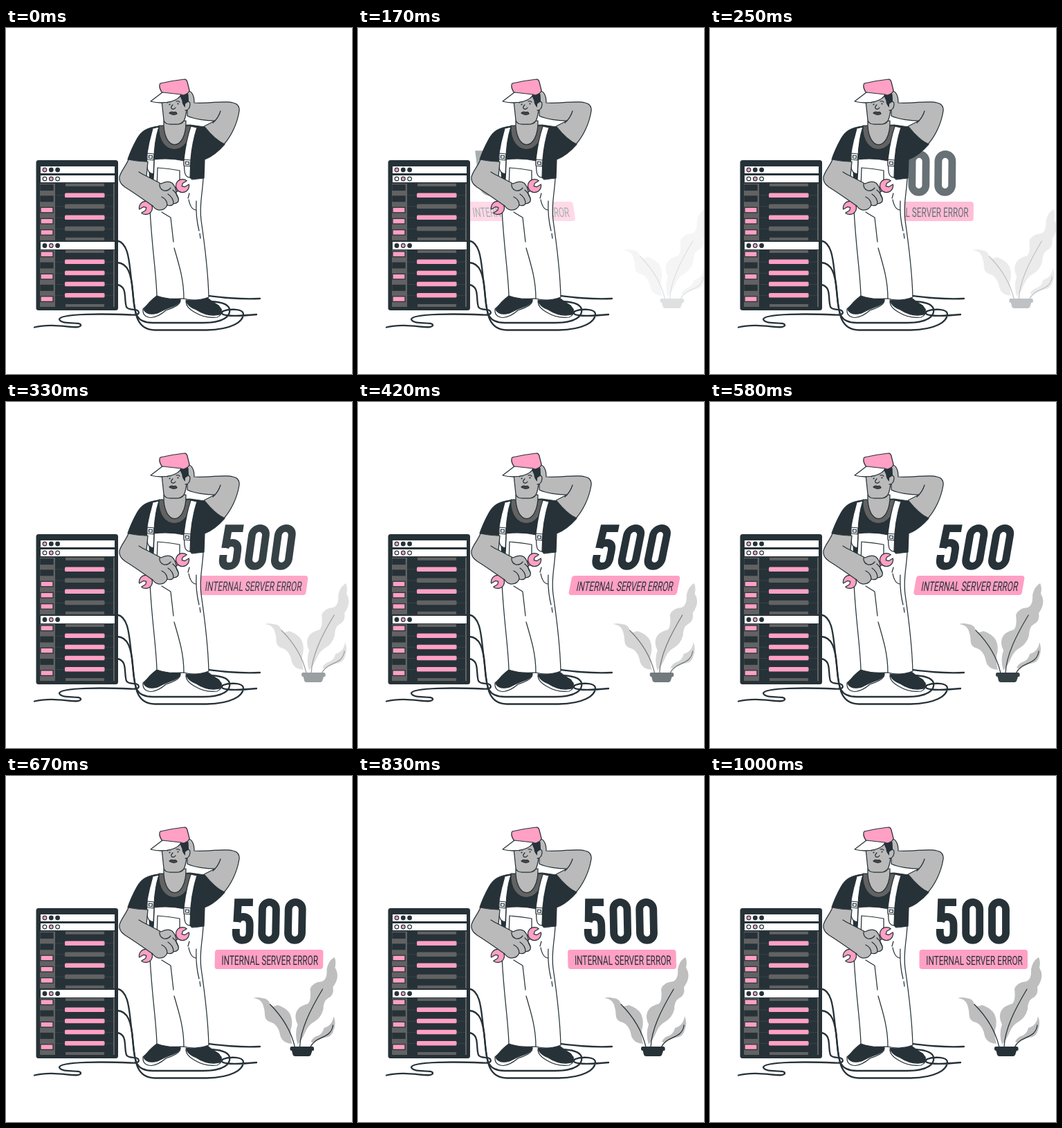
An HTML page for the animation above (1040 ms loop, 500x500 px).

```html
<!DOCTYPE html>
<html lang="en">
<head>
<meta charset="utf-8">
<title>500 Internal server error</title>
<style>
  html, body { margin: 0; width: 100%; height: 100%; overflow: hidden; background: #fff; }
  svg { display: block; width: 100vw; height: 100vh; }
  .ink { fill: #263238; }
  .pink { fill: #ffa0c4; }
  .skin { fill: #bababa; }
  .white { fill: #fff; }
  .line { fill: none; }
  .edge { stroke: #263238; stroke-width: 1.25; stroke-linecap: round; stroke-linejoin: round; }
  .cable { fill: none; stroke: #263238; stroke-width: 2.3; stroke-linecap: round; }
  .digits { fill: none; stroke: #263238; stroke-width: 10.8; }
  .label { font: 400 19px Roboto, "Liberation Sans", sans-serif; text-anchor: middle; }
</style>
</head>
<body>
<svg viewBox="0 0 500 500">
  <g id="sign">
    <g class="digits">
      <path d="M356 182.700H334.500L333.500 211M333.500 211Q335 203.500 342 203.500Q352 203.500 352 215V226Q352 237.300 342 237.300Q332.300 237.300 332.300 226V221"/>
      <rect x="369.700" y="182.400" width="20" height="54.900" rx="10"/>
      <rect x="407.500" y="182.400" width="20" height="54.900" rx="10"/>
    </g>
    <rect class="pink" x="302.500" y="251" width="156.500" height="28" rx="4"/>
    <text class="label ink" transform="translate(382 272.700) scale(.62 1)">INTERNAL SERVER ERROR</text>
  </g>

  <g id="plant">
    <g fill="#bebebe">
      <path d="M358 321Q363 319 371 321Q380 321 383 332Q387 334 393 331Q406 335 411 344Q416 355 412 367Q411 376 414 387Q400 386 397 376C395 363 389 357 381 355C372 351 376 343 373 335Q371 322 358 321Z"/>
      <path d="M475 262Q478 267 476 277Q484 290 473 305Q475 317 466 321Q459 325 459 337Q456 349 446 355Q437 360 433 370Q429 380 422 388Q417 373 422 359Q417 350 420 341Q424 332 437 329Q442 324 440 308Q443 298 457 297Q465 294 464 279Q466 269 472 264Z"/>
      <path d="M474 347Q478 357 474 367Q472 377 461 378Q453 380 445 386L441 384Q444 377 452 375Q458 372 460 364Q472 361 474 347Z"/>
    </g>
    <path class="edge line" d="M382 330C397 345 412 366 418 392M458 308C440 338 426 366 425 392M473 360C470 381 449 374 440 392"/>
    <path class="ink" d="M413 391H443Q445.500 391 445.500 393V396Q445.500 397 443 397L441 403Q440 405 438 405H418Q416 405 415 403L413.500 397Q411 397 411 395V393Q411 391 413 391Z"/>
  </g>

  <g class="cable">
    <path d="M161 307.500C179 311 178 345 182 370C186 400 183 436.500 215 436.500H290C325 436 343 425 343 413C342 405 322 406 314 409C306 415 320 418 362 414"/>
    <path d="M161 339C176 340 181 355 183 380C186 408 184 426 212 426H285C315 426 325 416 323 406C320 396 302 395 290 395"/>
    <path d="M161 371C176 374 170 391 174 403C177 409 188 405 191 409C194 414 188 415 180 414.500C145 413 78 412 77 421C80 430 109 423 108 430C104 437 72 425 41 432.500"/>
    <path d="M252 383C285 384 315 393 367 391"/>
  </g>

  <g id="server">
    <rect class="ink" x="43.500" y="191" width="118.500" height="217" rx="3.500"/>
  </g>

  <g id="man" class="edge">
    <path class="skin" d="M262 90Q272 92 272 108C290 110 318 104 328 108Q338 110 337 120C334 140 324 158 315 168L278 148C290 138 298 137 302 134C290 134 272 132 262 127Z"/>
    <path class="line" d="M310 120Q307 130 299 137"/>
    <path class="white" d="M218 391Q204 400 198 406Q197 418 210 418.500Q221 417 231 408Q253 401 252 393Z"/>
    <path class="ink" d="M218 387Q236 393 252 391Q252 398 242 402Q230 406 219 412Q204 416 199 407Q206 396 218 387Z"/>
    <path class="white" d="M260 395Q260 404 273 411Q288 420 305 418Q313 415 311 406L291 392Z"/>
    <path class="ink" d="M260 393Q276 396 291 390Q298 396 307 401Q314 409 309 414Q292 418 275 407Q262 402 260 393Z"/>
    <path class="ink" d="M219 142C204 144 196 149 190 159Q181 175 176 190L206 193L208 222L286 217L287 190Q302 184 316 168C306 164 295 153 287 143L266 140Z"/>
    <path d="M221 141C218 187 268 187 267 141Z" fill="#626262"/>
    <path class="skin" d="M228 134C226 180 261 180 260 134Z"/>
    <path class="white" d="M214 190Q236 187 258 192C259 205 264 215 269 219L285 217C284 240 279 255 282 278C287 312 292 350 293 389Q275 396 257 391L252 391Q235 393 218 387C217 352 211 320 208 262Q214 225 214 190Z"/>
    <path class="white" d="M212 145L221 143Q214 165 214 191L213 211Q204 210 204 199L203 186Q206 165 212 145Z"/>
    <path class="white" d="M267 142L276 144Q269 166 267 190L266 216Q259 216 258 207L257 190Q260 163 267 142Z"/>
    <path class="white" d="M204 181L214 182L213 191L204 190ZM257 190L267 191L266 200L257 199Z"/>
    <path class="line" d="M206.500 184L211.500 184.500L211 188.500L206.500 188ZM259.500 193L264.500 193.500L264 197.500L259.500 197ZM218 232L219 202Q235 203 251 206V222M265 239L263 246M264 248Q267 263 275 263M275 250C274 270 277 285 279 293M280 297L281 304M225 266L238 274L242 309M243 318C251 345 257 365 257 391"/>

    <path class="skin" d="M225 105L228 133Q229 139 237 139H249Q257 138 259 129L263 110V96H230Z"/>
    <path class="ink" d="M252 98L262 93L264 110Q260 107 259 114Q255 110 255 105Z"/>
    <path class="skin" d="M259 109Q266 103 266 111Q265 119 259 119"/>
    <path class="line" d="M241 111Q237 115 240 117Q243 118 245 115M233 108Q235 106 238 107M246 106Q249 105 251 107"/>
    <g class="ink" stroke="none">
      <circle cx="236.500" cy="110.500" r="1.100"/>
      <circle cx="248.500" cy="109.500" r="1.100"/>
    </g>
    <path d="M236 123Q239 120 242 122Q246 120 247 124Q242 127 236 123Z" fill="#45494b"/>
    <path class="pink" d="M223 80Q240 76 258 74Q261 74 262 78L265 90Q265 94 257 97L226 94Q221 87 222 82Z"/>
    <path class="white" d="M226 93L209 106Q224 110 239 106Q250 103 253 96Z"/>

    <g id="wrench" class="pink" transform="translate(228.500 244) rotate(-31)">
      <path d="M-28 -3H28V3H-28Z"/>
    </g>
    <path class="skin" d="M177 190C173 200 166 207 164 215C163 221 166 226 172 230C188 240 203 251 212 257Q216 263 222 263Q230 263 233 256Q239 258 242 254Q251 253 249 246Q245 240 246 236Q245 229 240 224Q234 220 224 225L203 214L205 193Q190 193 177 190Z"/>
    <path class="line" d="M203 214Q198 212 192 208M222 225Q221 232 228 235Q234 236 238 231M233 256Q233 248 225 244M242 254Q242 245 234 240M249 246Q247 239 241 234"/>
  </g>
</svg>
<script>
const $ = id => document.getElementById(id);
const svgNS = 'http://www.w3.org/2000/svg';
const INK = '#263238', PINK = '#ffa0c4', GREY = '#626262';

function add(parent, tag, attrs) {
  const el = document.createElementNS(svgNS, tag);
  for (const key in attrs) el.setAttribute(key, attrs[key]);
  parent.appendChild(el);
}

// Server rack
const server = $('server');
const box = (x, y, width, height, fill, more) => add(server, 'rect', { x, y, width, height, fill, ...more });

function lightBar(y, height, colours) {
  box(50, y, 107, height, '#fff');
  colours.forEach((fill, i) => add(server, 'circle',
    { cx: 56 + i * 9.3, cy: y + height / 2, r: 2.8, fill, stroke: INK, 'stroke-width': 1.2 }));
}

function rack(top, slots, bars) {
  box(49, top, 108, 82, GREY);
  box(71, top, 84, 82, INK);
  slots.forEach((fill, i) =>
    box(50, top + 2 + i * 16.2, 18, 7.6, fill, { stroke: INK, 'stroke-width': 1.3 }));
  box(86, top, 56, 4, GREY);
  box(86, top + 78, 56, 4, GREY);
  bars.forEach((fill, i) => {
    const y = top + 13.6 + i * 16.1;
    box(71, y + 3.2, 84, .5, '#45535a');
    box(85, y, 57.5, 6.5, fill, { rx: 1.5 });
  });
}

lightBar(200, 10, [PINK, INK, INK]);
lightBar(213, 10, ['#fff', PINK, '#fff']);
rack(224.8, [INK, INK, PINK, PINK, PINK], [PINK, GREY, PINK, GREY]);
lightBar(309, 11, [INK, PINK, INK]);
rack(321, [PINK, INK, PINK, INK, PINK], [PINK, PINK, PINK, PINK]);

// Wrench jaws
for (const side of [1, -1]) add($('wrench'), 'path', {
  d: 'M9 -3A9.500 9.500 0 1 0 9 3L2 3L-1 0L2 -3Z',
  transform: `translate(${side * 31} 0) scale(${side} 1)`
});

// Overshooting cubic-bezier(.36, -.01, .5, 1.38)
function ease(x) {
  const curve = (s, a, b) => 3 * (1 - s) ** 2 * s * a + 3 * (1 - s) * s * s * b + s ** 3;
  let lo = 0, hi = 1;
  for (let i = 0; i < 24; i++) {
    const mid = (lo + hi) / 2;
    if (curve(mid, .36, .5) < x) lo = mid; else hi = mid;
  }
  return curve(lo, -.01, 1.38);
}

const LOOP = 1040, FPS = 24, LEAD = .033;
const stops = [[0, 20], [.6, -10], [.8, 2], [1, 0]]
  .map(([time, deg]) => [time, Math.tan(deg * Math.PI / 180)]);

function skewAt(t) {
  const i = t < .6 ? 0 : t < .8 ? 1 : 2;
  const [t0, a] = stops[i], [t1, b] = stops[i + 1];
  return a + (b - a) * ease((t - t0) / (t1 - t0));
}

function draw(ms) {
  const step = Math.floor((ms + 4) / 1000 * FPS);
  const t = step < 2 ? 0 : Math.min(1, step / FPS + LEAD);

  const enter = t < .6 ? ease(t / .6) : 1;
  const skew = skewAt(t), pivot = 228;
  $('sign').setAttribute('transform', `matrix(1 0 ${skew} 1 ${250 * (enter - 1) - skew * pivot} 0)`);
  $('sign').setAttribute('opacity', Math.min(1, Math.max(0, enter)));

  const slide = ease(t);
  $('plant').setAttribute('transform', `translate(${30 * (1 - slide)} 0)`);
  $('plant').setAttribute('opacity', Math.min(1, Math.max(0, slide)));
}

const start = performance.now();
function tick() {
  draw((performance.now() - start) % LOOP);
  requestAnimationFrame(tick);
}
tick();
</script>
</body>
</html>
```
